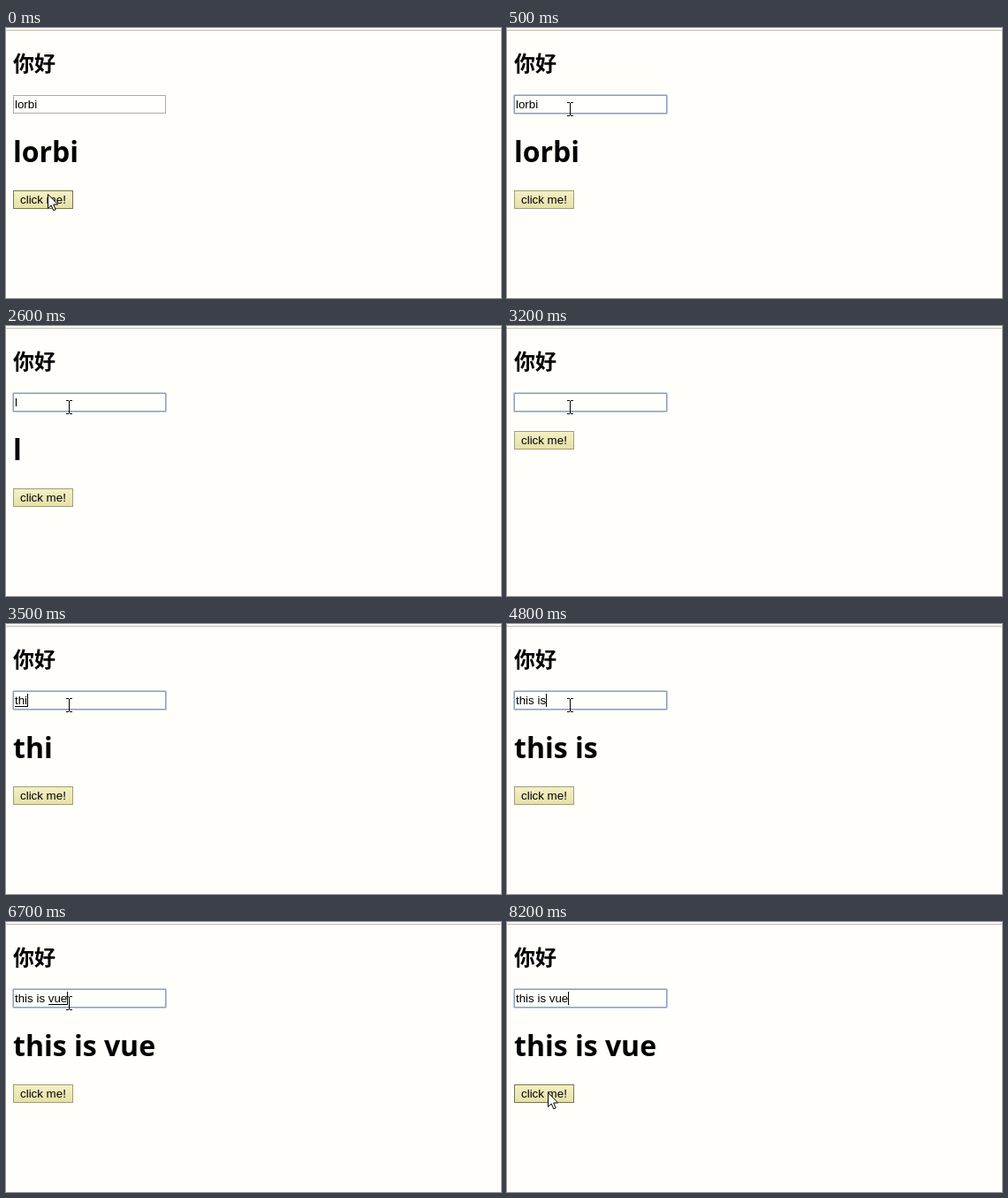
Animation of 560x306 px, one loop 8.3 s. Source, as an HTML page:

```html
<!DOCTYPE html>
<html lang="zh">
<head>
<meta charset="utf-8">
<title>Two-way binding</title>
<style>
  html, body { margin: 0; width: 100%; height: 100%; overflow: hidden; background: #fffefa; }
  svg { display: block; width: 100vw; height: 100vh; }
  text { white-space: pre; fill: #000; }
  .title { font: bold 24px "Noto Sans CJK SC", "Noto Sans CJK", sans-serif; }
  .echo { font: bold 32px "Open Sans", "Noto Sans", sans-serif; }
  .ui { font: 13.333px "Liberation Sans", Arial, sans-serif; }
</style>
</head>
<body>
<svg viewBox="0 0 560 306">
  <defs>
    <linearGradient id="face" x1="0" y1="0" x2="0" y2="1">
      <stop offset="0" stop-color="#f3f0c4"/>
      <stop offset="1" stop-color="#e6e1a8"/>
    </linearGradient>
  </defs>
  <rect width="560" height="306" fill="#fffefa"/>
  <rect y="2" width="560" height="1" fill="#bdbcb4"/>
  <text class="title" x="8" y="48.5">你好</text>

  <rect id="ring" x="7.5" y="75.5" width="174" height="22" rx="1" fill="none" stroke="#bccbdc"/>
  <rect id="field" x="8.5" y="76.5" width="172" height="20" fill="#fffffc"/>
  <text id="value" class="ui" x="10" y="91"></text>
  <rect id="underline" y="93" height="1"/>
  <rect id="caret" y="79" width="1" height="15"/>

  <text id="echo" class="echo" x="8" y="152"></text>

  <g id="button">
    <rect id="face-box" x="8.5" y="184.5" width="67" height="20" fill="url(#face)"/>
    <text class="ui" x="16" y="199">click me!</text>
  </g>

  <path id="arrow" d="M.5 .5V16.5L4.2 13L6.8 18.8L9.2 17.8L6.7 12H11.7Z" fill="#fff" stroke="#000"/>
  <path id="beam" d="M-3 -7.5H0M1 -7.5H4M.5 -7V7M-3 7.5H0M1 7.5H4" fill="none" stroke="#000"/>
</svg>
<script>
const LOOP = 8300;
const INPUT_X = 10;
const $ = id => document.getElementById(id);

// time, text, caret shown, start of the composed part (-1: none)
const typing = [
  [0, 'lorbi', 0, -1],
  [600, 'lorbi', 1, -1],
  [1100, 'lorbi', 0, -1],
  [1500, 'lorb', 0, -1],
  [1600, 'lorb', 1, -1],
  [1700, 'lor', 1, -1],
  [1800, 'lo', 1, -1],
  [2000, 'l', 1, -1],
  [2200, 'l', 0, -1],
  [2700, '', 1, -1],
  [3200, '', 0, -1],
  [3300, 't', 1, 0],
  [3400, 'th', 1, 0],
  [3500, 'thi', 1, 0],
  [3600, 'this', 1, 0],
  [4000, 'this', 1, -1],
  [4200, 'this ', 1, -1],
  [4500, 'this i', 1, 5],
  [4600, 'this is', 1, 5],
  [4800, 'this is', 1, -1],
  [5300, 'this is ', 1, -1],
  [5800, 'this is ', 0, -1],
  [6300, 'this is v', 1, 8],
  [6500, 'this is vu', 1, 8],
  [6600, 'this is vue', 1, 8],
  [7000, 'this is vue', 1, -1],
  [7500, 'this is vue', 0, -1],
  [8000, 'this is vue', 1, -1]
];

// time, x, y, shape
const pointer = [
  [0, 47, 188, 'arrow'],
  [100, 48, 182, 'arrow'],
  [200, 54, 152, 'beam'],
  [300, 63, 116, 'arrow'],
  [400, 70, 95, 'beam'],
  [500, 71, 92, 'beam'],
  [7900, 68, 112, 'arrow'],
  [8000, 57, 172, 'arrow'],
  [8100, 49, 216, 'arrow'],
  [8200, 46, 193, 'arrow']
];

const pen = document.createElement('canvas').getContext('2d');
pen.font = '13.333px "Liberation Sans", Arial, sans-serif';
const endOf = text => Math.round(INPUT_X + pen.measureText(text).width);

const at = (track, t) => track.findLast(key => key[0] <= t);
const set = (id, attrs) => {
  for (const name in attrs) $(id).setAttribute(name, attrs[name]);
};
const show = (id, on) => set(id, { visibility: on ? 'visible' : 'hidden' });

function draw(t) {
  const [, text, caret, from] = at(typing, t);
  const [, x, y, shape] = at(pointer, t);
  const focused = t >= 500;

  $('value').textContent = text;
  $('echo').textContent = text;
  show('ring', focused);
  set('field', { stroke: focused ? '#8a9fbd' : '#adac98' });

  show('caret', caret);
  set('caret', { x: endOf(text) });
  show('underline', from >= 0);
  if (from >= 0) {
    const start = endOf(text.slice(0, from));
    set('underline', { x: start, width: endOf(text) - start });
  }

  // an empty heading collapses and pulls the button up
  const lift = text ? 0 : -65;
  const top = 184 + lift;
  const hover = x >= 8 && x < 76 && y >= top && y < top + 21;
  set('button', { transform: `translate(0 ${lift})` });
  set('face-box', { stroke: hover ? '#77744f' : '#a19d7c' });

  for (const id of ['arrow', 'beam']) show(id, id === shape);
  set(shape, { transform: `translate(${x} ${y})` });
}

function tick(now) {
  draw(now % LOOP);
  requestAnimationFrame(tick);
}
draw(0);
requestAnimationFrame(tick);
</script>
</body>
</html>
```
